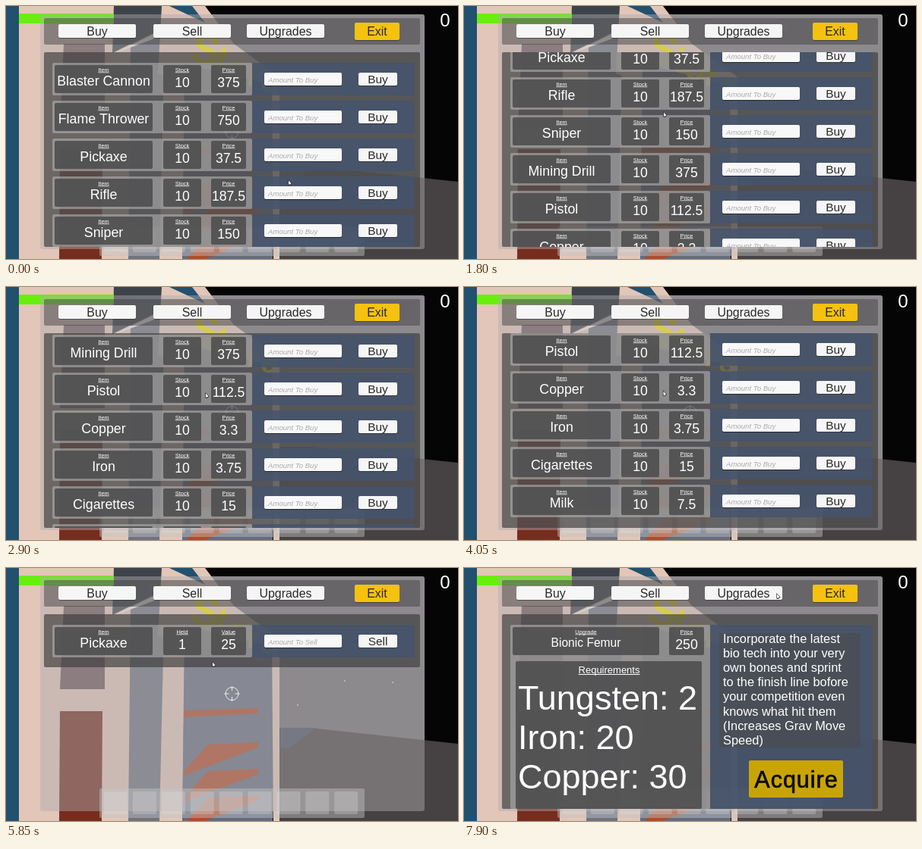
Animation of 595x334 px, one loop 8000 ms. Source, as an HTML page with a canvas:

```html
<!DOCTYPE html>
<html lang="en">
<head>
<meta charset="utf-8">
<title>Store menu</title>
<style>
  html, body { margin: 0; width: 100%; height: 100%; overflow: hidden; background: #050506; }
  canvas { display: block; }
</style>
</head>
<body>
<canvas id="stage" width="595" height="334"></canvas>
<script>
const LOOP = 8000;
const ctx = document.getElementById('stage').getContext('2d');
const FONT = '"Liberation Sans", Arial, sans-serif';

const ITEMS = {
  'Blaster Cannon': '375', 'Flame Thrower': '750', 'Pickaxe': '37.5',
  'Rifle': '187.5', 'Sniper': '150', 'Mining Drill': '375', 'Pistol': '112.5',
  'Copper': '3.3', 'Iron': '3.75', 'Cigarettes': '15', 'Milk': '7.5'
};
const DESCRIPTION = [
  'Incorporate the latest', 'bio tech into your very', 'own bones and sprint',
  'to the finish line bofore', 'your competition even', 'knows what hit them',
  '(Increases Grav Move', 'Speed)'
];

// Each burst of the wheel is two notches: one at its start, one halfway.
const BURSTS = [[500, 650], [900, 1450], [1700, 2000], [2150, 2350], [2550, 2900], [3150, 3350]];
const NOTCH = 26.2;
const MOVES = [
  { from: 0, to: 250, x: 263, y: 140 },
  { from: 4000, to: 4550, x: 246, y: 31 },
  { from: 4850, to: 5200, x: 272, y: 124 },
  { from: 6500, to: 7000, x: 412, y: 34 }
];
const SELL_CLICK = 4700, UPGRADES_CLICK = 7450;

const clamp = v => Math.max(0, Math.min(1, v));
const ease = v => v * v * (3 - 2 * v);

const scrollAt = t => BURSTS.reduce(
  (y, [from, to]) => y + NOTCH * ((t >= from) + (t >= (from + to) / 2)), 0);

function pointerAt(t) {
  let x = 372, y = 230;
  for (const move of MOVES) {
    const k = ease(clamp((t - move.from) / (move.to - move.from)));
    x += (move.x - x) * k;
    y += (move.y - y) * k;
  }
  return [x, y];
}

// A clicked button darkens and recovers over 100 ms each way.
const pressAt = (t, click) => clamp((t - click) / 100) - clamp((t - click - 150) / 100);

function box(x1, y1, x2, y2, color, radius = 2) {
  ctx.fillStyle = color;
  ctx.beginPath();
  ctx.roundRect(x1, y1, x2 - x1, y2 - y1, radius);
  ctx.fill();
}

function poly(color, ...p) {
  ctx.fillStyle = color;
  ctx.beginPath();
  for (let i = 0; i < p.length; i += 2) ctx.lineTo(p[i], p[i + 1]);
  ctx.fill();
}

function text(str, x, baseline, size, color = '#fff', align = 'center', style = '') {
  ctx.font = `${style} ${size}px ${FONT}`;
  ctx.textAlign = align;
  ctx.fillStyle = color;
  ctx.fillText(str, x, baseline);
}

function underlined(str, x, baseline, size) {
  text(str, x, baseline, size);
  const w = ctx.measureText(str).width;
  ctx.fillRect(x - w / 2, baseline + 1, w, size > 10 ? 1 : 0.7);
}

function button(str, x, y, w, color = '#f6f6f6', h = 18, size = 15.9) {
  box(x, y + 1, x + w, y + h + 1, 'rgba(30,30,30,.5)');
  box(x, y, x + w, y + h, color);
  text(str, x + w / 2, y + h / 2 + size * 0.36, size, '#292929');
}

function drawSign() {
  [...'Store'].forEach((letter, i) => {
    ctx.save();
    ctx.translate(259 + i * 22 - i * i * 0.2, 76 + i * 12 - i * i * 0.7);
    ctx.rotate(0.2);
    text(letter, 0, 0, 56 - i * 5, '#f6e600', 'center', 'bold');
    ctx.restore();
  });
}

function drawScene() {
  const peach = '#e2c6b8', blue = '#22506f', slate = '#646c7d';
  box(0, 0, 595, 334, '#050506', 0);
  box(45, 11, 551, 321, '#706e72', 3);
  poly('#464142', 355, 211, 400, 211, 595, 232, 595, 334, 355, 334);
  poly('#46505f', 361, 211, 408, 211, 372, 238, 361, 238);

  // Left doorway
  box(0, 0, 17, 334, blue, 0);
  poly(peach, 17, 0, 165, 0, 162, 334, 17, 334);
  poly('#6e575b', 76, 50, 130, 50, 130, 160, 71, 160);
  poly('#762d1e', 71, 189, 127, 189, 126, 334, 70, 334);
  poly('#6e737f', 164, 50, 225, 28, 207, 334, 161, 334);

  // Arch and beam above the shelf
  poly('#3d434b', 142, 0, 210, 0, 205, 30, 140, 62);
  poly(peach, 205, 0, 262, 0, 300, 50, 362, 95, 350, 108, 200, 90);
  poly(blue, 215, 0, 245, 0, 262, 22);
  poly('#f5eee8', 139, 64, 220, 24, 198, 42);

  // Shelf
  poly(peach, 208, 70, 236, 70, 232, 334, 202, 334);
  poly(slate, 235, 76, 351, 104, 351, 334, 232, 334);
  [188, 233, 268, 303].forEach((y, i) => {
    const depth = Math.min(i, 1) * 32;
    poly('#af4b28', 234, y + 3 + depth, 234 + depth, y, 332, y - 3, 332, y + 4, 234, y + 9 + depth);
  });
  poly(peach, 350, 100, 360, 97, 360, 334, 352, 334);
  drawSign();

  ctx.fillStyle = '#bbb';
  for (const [x, y] of [[383, 180], [445, 148], [508, 150]]) ctx.fillRect(x, y, 2, 2);
}

function drawHud() {
  box(123, 291, 472, 330, 'rgba(195,195,196,.45)');
  for (let i = 0; i < 9; i++) box(129 + i * 37.9, 295, 160 + i * 37.9, 325, 'rgba(230,230,230,.25)');
  ctx.strokeStyle = 'rgba(255,255,255,.85)';
  ctx.lineWidth = 1;
  ctx.beginPath();
  ctx.arc(297.5, 166, 8.5, 0, Math.PI * 2);
  for (let i = 0; i < 4; i++) {
    const dx = Math.cos(i * Math.PI / 2), dy = Math.sin(i * Math.PI / 2);
    ctx.moveTo(297.5 + dx * 4, 166 + dy * 4);
    ctx.lineTo(297.5 + dx * 10, 166 + dy * 10);
  }
  ctx.stroke();
}

function drawHeader(t) {
  const tint = click => `hsl(0 0% ${96 - 14 * pressAt(t, click)}%)`;
  box(50, 16, 545, 51, 'rgba(60,60,60,.47)');
  button('Buy', 69, 24, 102);
  button('Sell', 194, 24, 102, tint(SELL_CLICK));
  button('Upgrades', 317, 24, 102, tint(UPGRADES_CLICK));
  button('Exit', 459, 22, 59, '#f4c20f', 23);
  text('0', 578, 27, 24);
}

const content = bottom => box(50, 61, 545, bottom, 'rgba(60,60,60,.66)');

function shell(y1, y2) {
  box(324, y1, 538, y2, 'rgba(68,84,110,.8)');
  box(61, y1, 324, y2, 'rgba(180,180,180,.58)');
}

function field(label, value, x1, x2, y, size, drop) {
  box(x1, y, x2, y + 37, 'rgba(72,72,74,.82)');
  const mid = (x1 + x2) / 2;
  underlined(label, mid, y + 8.5, 7.4);
  text(value, mid, y + drop, size);
}

function drawRow(y, labels, values, action) {
  shell(y, y + 43);
  field(labels[0], values[0], 64, 193, y + 3, 17.8, 27);
  field(labels[1], values[1], 207, 257, y + 3, 17.6, 28.5);
  field(labels[2], values[2], 270, 316, y + 3, 17.6, 29);
  box(340, y + 14, 442, y + 31, 'rgba(25,25,25,.75)');
  box(340, y + 13, 442, y + 30, '#f8f8f8');
  text(`Amount To ${action}`, 345, y + 25.5, 9.6, '#aaa', 'left', 'italic');
  button(action, 464, y + 13, 51, '#f6f6f6', 17, 15.4);
}

function drawBuy(t) {
  content(318);
  ctx.save();
  ctx.beginPath();
  ctx.rect(50, 61, 495, 257);
  ctx.clip();
  const top = 75 - Math.round(scrollAt(t));
  Object.entries(ITEMS).forEach(([name, price], i) =>
    drawRow(top + i * 50, ['Item', 'Stock', 'Price'], [name, '10', price], 'Buy'));
  ctx.restore();
}

function drawSell() {
  content(131);
  drawRow(75, ['Item', 'Held', 'Value'], ['Pickaxe', '1', '25'], 'Sell');
}

function drawUpgrades() {
  content(318);
  shell(75, 318);
  field('Upgrade', 'Bionic Femur', 64, 257, 78, 15.6, 26);
  field('Price', '250', 270, 316, 78, 17.8, 29);
  box(68, 123, 313, 318, 'rgba(72,72,74,.82)');
  underlined('Requirements', 191, 139, 13);
  ['Tungsten: 2', 'Iron: 20', 'Copper: 30'].forEach((line, i) =>
    text(line, 71, 187 + i * 52, 45, '#fff', 'left'));
  box(336, 86, 522, 237, 'rgba(74,76,80,.7)');
  DESCRIPTION.forEach((line, i) => text(line, 341, 99 + i * 19.1, 16.4, '#fff', 'left'));
  box(375, 254, 499, 303, '#c9a406');
  ctx.letterSpacing = '1px';
  text('Acquire', 437.5, 290, 30.5, '#0c0c0c');
  ctx.strokeStyle = '#0c0c0c';
  ctx.lineWidth = 0.7;
  ctx.strokeText('Acquire', 437.5, 290);
  ctx.letterSpacing = '0px';
}

function drawPointer(t) {
  ctx.save();
  ctx.translate(...pointerAt(t));
  poly('#333', -0.7, -1, 4.6, 4.5, 1.6, 7, -0.7, 6.5);
  poly('#fff', 0, 0.5, 3.5, 4.2, 1.2, 5.8, 0, 5.3);
  ctx.restore();
}

function draw(t) {
  drawScene();
  box(17, 10, 142, 23, '#68f00c', 0);
  box(45, 11, 551, 321, 'rgba(175,172,175,.45)', 3);
  drawHud();
  drawHeader(t);
  if (t < SELL_CLICK + 50) drawBuy(t);
  else if (t < UPGRADES_CLICK + 50) drawSell();
  else drawUpgrades();
  drawPointer(t);
}

const start = performance.now();
function tick() {
  draw((performance.now() - start) % LOOP);
  requestAnimationFrame(tick);
}
tick();
</script>
</body>
</html>
```
